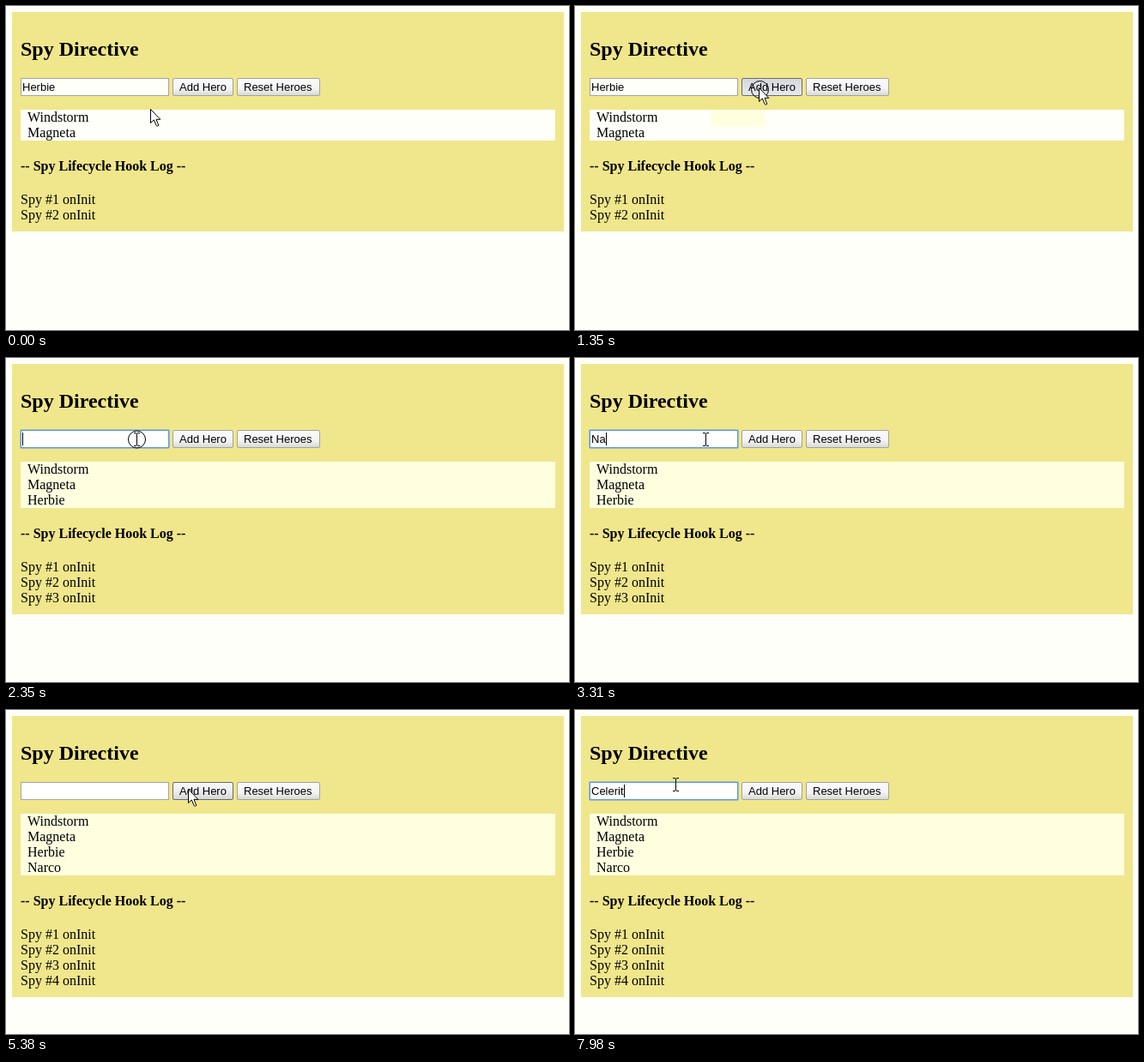
Recreate the animation shown at these times as an HTML page. Size 656 by 378 pixels, loop 8000 ms.

```html
<!DOCTYPE html>
<html lang="en">
<head>
<meta charset="utf-8">
<title>Spy Directive</title>
<style>
  html, body { margin: 0; width: 100%; height: 100%; overflow: hidden; background: #fefff8; }
  svg { display: block; }
  text { font: 16px "Liberation Serif", "Times New Roman", serif; white-space: pre; }
  .title { font-size: 24px; font-weight: bold; }
  .subtitle { font-weight: bold; }
  .ui { font: 13px "Liberation Sans", Arial, sans-serif; }
  .button { fill: url(#normal); stroke: #a3a39c; }
  .button.hover { fill: url(#hover); stroke: #6a6a6a; }
  .button.pressed { fill: url(#pressed); stroke: #6a6a6a; }
</style>
</head>
<body>
<svg width="656" height="378" viewBox="0 0 656 378">
  <defs>
    <linearGradient id="normal" x2="0" y2="1">
      <stop stop-color="#fbfbfa"/><stop offset=".6" stop-color="#f3f3f3"/><stop offset="1" stop-color="#d8d8d8"/>
    </linearGradient>
    <linearGradient id="hover" x2="0" y2="1">
      <stop stop-color="#f8f8f9"/><stop offset=".5" stop-color="#ededf0"/><stop offset="1" stop-color="#d6d6da"/>
    </linearGradient>
    <linearGradient id="pressed" x2="0" y2="1">
      <stop stop-color="#d6d8de"/><stop offset="1" stop-color="#e6e8ee"/>
    </linearGradient>
  </defs>

  <rect id="panel" x="7" y="7" width="643" fill="#f0e68c"/>
  <text class="title" x="17" y="58">Spy Directive</text>

  <rect id="field" x="17.5" y="84.5" width="172" height="20" stroke="#a5a5a0"/>
  <g id="focus" fill="none">
    <rect x="16.5" y="83.5" width="174" height="22" rx="1.5" stroke="#a4bfc4"/>
    <rect x="17.5" y="84.5" width="172" height="20" stroke="#5f97d4"/>
  </g>
  <text id="value" class="ui" x="19" y="99"></text>
  <rect id="caret" y="87" width="1" height="15"/>

  <rect id="add" class="button" x="194.5" y="84.5" width="70" height="20" rx="1.5"/>
  <text class="ui" x="202" y="99">Add Hero</text>
  <rect class="button" x="269.5" y="84.5" width="96" height="20" rx="1.5"/>
  <text class="ui" x="277" y="99">Reset Heroes</text>

  <rect id="list" x="17" y="121" width="623"/>
  <rect id="tint" x="158" y="122" width="63" height="19" fill="#ffffe0"/>
  <g id="heroes"></g>
  <g id="log">
    <text class="subtitle" x="17" y="192">-- Spy Lifecycle Hook Log --</text>
  </g>

  <circle id="click" r="10" fill="none" stroke="#000"/>
  <path id="arrow" fill="#fff" stroke="#000" d="M.5 .5V16.5L4.3 12.9L7.2 19.6Q8.5 21 9.8 19.3L7 12.3H11.8Z"/>
  <path id="beam" fill="none" stroke="#000" d="M-3 -7.5H0M1 -7.5H4M.5 -7V7M-3 7.5H0M1 7.5H4"/>
</svg>
<script>
const LOOP = 8000;
const ui = Object.fromEntries([...document.querySelectorAll('svg [id]')].map(e => [e.id, e]));

const values = [
  [0, 'Herbie'], [1500, ''],
  [3310, 'Na'], [3460, 'Nar'], [3710, 'Narco'], [5380, ''],
  [7070, 'C'], [7320, 'Ce'], [7470, 'Cel'], [7590, 'Cele'],
  [7740, 'Celer'], [7860, 'Celeri'], [7980, 'Celerit'],
];
const pointer = [
  [0, 'arrow', 168, 120], [840, 'arrow', 158, 120], [960, 'arrow', 209, 102],
  [1080, 'arrow', 214, 95], [1780, 'arrow', 194, 94],
  [1930, 'beam', 164, 95], [2080, 'beam', 155, 95], [2200, 'beam', 152, 95],
  [4240, 'beam', 194, 94], [4390, 'arrow', 212, 92],
  [5660, 'beam', 122, 88], [5810, 'beam', 117, 87],
];
const counts = [[0, 2], [1500, 3], [5380, 4]];
const buttonStates = [
  [0, ''], [1080, 'hover'], [1200, 'pressed'], [1500, 'hover'],
  [1930, ''], [4390, 'hover'], [5660, ''],
];
const focusSpans = [[2350, 5380], [5960, LOOP]];
const caretSpans = [[2350, 2880], [3310, 4390], [4820, 5380], [5960, 6480], [7070, LOOP]];
const clickSpans = [[1350, 1500], [2350, 2470], [5960, 6080]];

const current = (steps, t) => steps.findLast(([start]) => start <= t).slice(1);
const within = (spans, t) => spans.some(([from, to]) => t >= from && t < to);
const set = (el, attrs) => { for (const k in attrs) el.setAttribute(k, attrs[k]); };
const show = (el, on) => set(el, { visibility: on ? 'visible' : 'hidden' });

function addLine(parent, x, y, content) {
  const line = document.createElementNS(parent.namespaceURI, 'text');
  set(line, { x, y });
  line.textContent = content;
  parent.append(line);
  return line;
}
const rows = ['Windstorm', 'Magneta', 'Herbie', 'Narco'].map((name, i) => [
  addLine(ui.heroes, 25, 135 + 18 * i, name),
  addLine(ui.log, 17, 231 + 18 * i, `Spy #${i + 1} onInit`),
]);

function render(t) {
  const [count] = current(counts, t);
  const [value] = current(values, t);
  const [cursor, x, y] = current(pointer, t);
  const [buttonState] = current(buttonStates, t);
  const added = count - 2;

  set(ui.panel, { height: 256 + 36 * added });
  set(ui.list, { height: 18 * count, fill: added ? '#ffffe0' : '#fefff8' });
  set(ui.log, { transform: `translate(0 ${18 * added})` });
  rows.forEach((row, i) => row.forEach(line => show(line, i < count)));
  show(ui.tint, t >= 960 && t < 1500);

  set(ui.field, { fill: added ? '#fff' : '#fefff8' });
  if (ui.value.textContent !== value) ui.value.textContent = value;
  set(ui.caret, { x: 19 + (value ? Math.ceil(ui.value.getComputedTextLength()) : 0) });
  show(ui.caret, within(caretSpans, t));
  show(ui.focus, within(focusSpans, t));
  set(ui.add, { class: `button ${buttonState}` });

  const clickY = cursor === 'arrow' ? y + 2.5 : y;
  set(ui.click, { cx: x + (cursor === 'arrow' ? 1.5 : .5), cy: clickY });
  show(ui.click, within(clickSpans, t));
  for (const name of ['arrow', 'beam']) show(ui[name], name === cursor);
  set(ui[cursor], { transform: `translate(${x} ${y})` });
}

const start = performance.now();
function frame() {
  render((performance.now() - start) % LOOP);
  requestAnimationFrame(frame);
}
frame();
</script>
</body>
</html>
```
